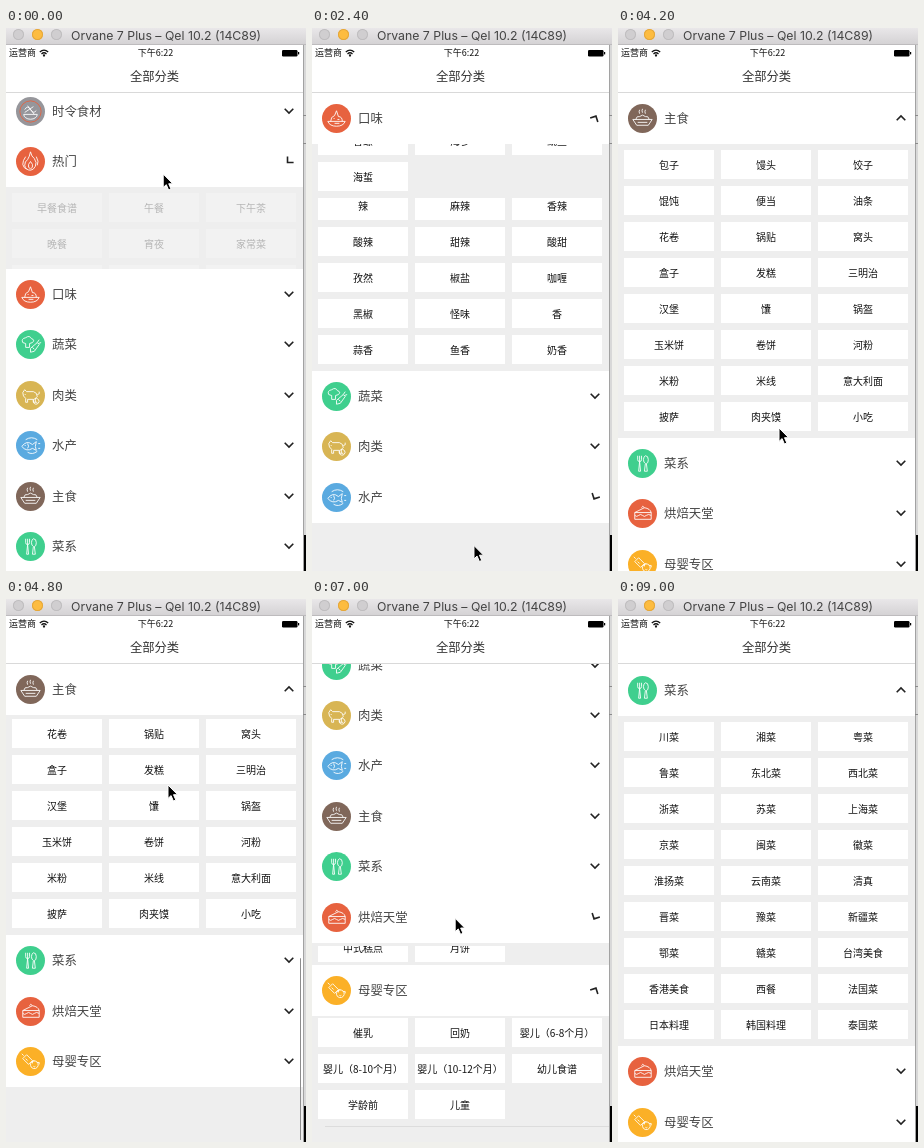
These frames come from a looping animation (300 by 543 pixels, 9.2 s). An HTML page:

```html
<!DOCTYPE html>
<html lang="zh-CN">
<head>
<meta charset="utf-8">
<title>全部分类</title>
<style>
  html, body { margin: 0; width: 100%; height: 100%; overflow: hidden; }
  body { position: relative; background: #efefef; color: #444;
    font-family: "Noto Sans CJK SC", "Noto Sans CJK", sans-serif; }
  #stage { position: absolute; left: 0; top: 0; width: 300px; height: 543px; overflow: hidden; }
  #stage div, #stage svg { position: absolute; }
  #stage svg { overflow: visible; }
  #list { left: 0; top: 0; width: 297px; height: 543px; overflow: hidden; background: #eee; isolation: isolate; }
  .head { left: 0; top: 0; width: 297px; height: 51px; background: #fff; z-index: 2; }
  .head .label { left: 46px; top: 0; font-size: 12.4px; line-height: 50px; white-space: nowrap; }
  .head .icon { left: 9.5px; top: 10.5px; width: 29px; height: 29px; }
  .head .chev { left: 278px; top: 20px; width: 10px; height: 10px; }
  .body { left: 0; top: 0; width: 297px; overflow: hidden; }
  .cells { left: 0; width: 297px; background: #eee; }
  .cell { width: 90px; height: 29px; background: #fff; color: #111; text-align: center;
    font-size: 10px; line-height: 29px; white-space: nowrap; }
  #rule { left: 13px; top: 0; width: 284px; height: 1px; background: #dcdcdc; }
  #bar { left: 293.5px; top: 359px; width: 1.6px; height: 182px; border-radius: 1px; background: #8c8c8c; z-index: 3; }
  #nav { left: 0; top: 17px; width: 297px; height: 47px; background: #fff; border-bottom: 1px solid #d9d9d9; color: #111; }
  #nav div { white-space: nowrap; }
  #win { left: 0; top: 0; width: 300px; height: 17px; background: linear-gradient(#e9e7e9, #d3d1d3);
    box-shadow: inset 0 -1px #bdbbbd; }
  #win .dot { top: 1px; width: 11px; height: 11px; border-radius: 50%; background: #d0ced0; box-shadow: inset 0 0 0 1px #bfbdbf; }
  #win .title { left: 65px; top: 0; font: 12.3px/15px Inter, sans-serif; color: #444; white-space: nowrap; }
  #edge { left: 297px; top: 17px; width: 3px; height: 526px;
    background: linear-gradient(#8b8b8b, #8b8b8b) 0 70px / 3px 1px no-repeat,
      linear-gradient(#8b8b8b, #8b8b8b) 0 98px / 3px 1px no-repeat,
      linear-gradient(#000, #000) 1px 490px / 2px 36px no-repeat,
      linear-gradient(90deg, #a2a2a2 1px, #d8d8d8 1px); }
</style>
</head>
<body>
<div id="stage">
  <div id="list"><div id="rule"></div><div id="bar"></div></div>
  <div id="nav">
    <div style="left:3px;top:1px;font-size:9px;line-height:14px">运营商</div>
    <svg style="left:33px;top:4px" width="10" height="8" fill="none" stroke="#111" stroke-width="1.3">
      <path d="M.8 3Q5-.8 9.2 3M2.5 4.9Q5 2.6 7.5 4.9"/><circle cx="5" cy="6.5" r=".5"/>
    </svg>
    <div style="left:0;top:1px;width:299px;text-align:center;font-size:9px;font-weight:500;line-height:14px">下午6:22</div>
    <svg style="left:276px;top:5px" width="18" height="7"><rect width="15.5" height="6.4" rx="1.2"/><rect x="16" y="2" width="1.2" height="2.4"/></svg>
    <div style="left:0;top:20px;width:297px;text-align:center;font-size:12.3px;line-height:22px;color:#333">全部分类</div>
  </div>
  <div id="edge"></div>
  <div id="win">
    <div class="dot" style="left:7px"></div>
    <div class="dot" style="left:26px;background:#fdbc40;box-shadow:inset 0 0 0 1px #e3a63a"></div>
    <div class="dot" style="left:45px"></div>
    <div class="title">Orvane 7 Plus – Qel 10.2 (14C89)</div>
  </div>
  <svg id="cursor" width="12" height="18">
    <path d="M0 0V13.4L3.1 10.6 5.4 16 7.8 15 5.5 9.7H9.6Z" fill="#000" stroke="#fff" stroke-width="1"/>
  </svg>
</div>
<script>
const LOOP = 9200, STEP = 200, MOVE = 500;
const TOP = 64.6, BOTTOM = 548, HEAD = 50.4, ROW = 36;

// label, disc colour, icon strokes, cells
const SECTIONS = [
  ['时令食材', '#96969b', 'M8 18a7 5 0 0 0 14 0zM9 13q3-5 6 0t6 1M12 9l7 9M9 16l9-6', ''],
  ['热门', '#e7623f', 'M15 5q1 5 4 7 3 4 1 8-2 4-5 4-5 0-6-5 0-4 3-6 2-3 3-8M10 10q-3 4-3 8 1 4 4 5M15 15q3 3 2 6-2 3-4 0-1-3 2-6M21 10q3 5 1 9',
    '早餐食谱 午餐 下午茶 晚餐 宵夜 家常菜 快手菜 凉菜 汤羹 甜品 饮品 小吃 烧烤 火锅 便当 素菜 粥 面食 沙拉 炒饭 卤味 果汁 零食 点心 炖菜 蒸菜 酱料'],
  ['口味', '#e7623f', 'M6 18h18q-2 5-9 5t-9-5M9 18q0-5 4-6l2-5 2 6q4 0 4 5M12 15h1M16 16h2M13 20h5',
    '清淡 咸鲜 原味 酸 甜 苦 辣 麻辣 香辣 酸辣 甜辣 酸甜 孜然 椒盐 咖喱 黑椒 怪味 香 蒜香 鱼香 奶香'],
  ['蔬菜', '#3fcf8e', 'M7 13q-2-4 3-5 4-3 6 1 4 1 1 4l-3 1v4h-4v-4zM15 19l7-6 2 2-5 7-4 1zM22 13l2-3M23 14l3-1M17 18l2 2', ''],
  ['肉类', '#d8b554', 'M7 12l2-3 2 2h7q4 1 4 5l-2 2v4h-2v-3h-6v3h-2v-4q-3-2-3-6M9 14h1M22 14q3 0 2-3M18 22a3 3 0 1 1 5 1 3 3 0 0 1-5-1M20 22h2', ''],
  ['水产', '#5aaae0', 'M6 16q5-7 11-2l4-3-1 5 1 4-4-2q-6 4-11-2M9 15h1M12 13q2 3 0 5M10 9q6-4 12 0M12 22q5 3 10-1M23 13h2M23 18h2',
    '草鱼 鲫鱼 虾仁 海虾 河虾 北极虾 龙虾 明虾 基围虾 小龙虾 皮皮虾 对虾 江虾 大闸蟹 梭子蟹 河蟹 螃蟹 青蟹 海蟹 蛤蜊 蛏子 鲍鱼 扇贝 生蚝 香螺 海参 鱿鱼 海蜇'],
  ['主食', '#80675a', 'M5 16h20l-4 6H9zM8 16q1-4 4-3 3-3 6 0 3-1 4 3M12 10q-1-2 0-4M15 9q-1-2 0-4M18 10q-1-2 0-4M10 19h10',
    '包子 馒头 饺子 馄饨 便当 油条 花卷 锅贴 窝头 盒子 发糕 三明治 汉堡 馕 锅盔 玉米饼 卷饼 河粉 米粉 米线 意大利面 披萨 肉夹馍 小吃'],
  ['菜系', '#3fcf8e', 'M10 7v4q0 2 2 2t2-2V7M12 7v6l-1 10h2l-1-10M18 7q3 0 3 4t-2 4l1 8h-3l1-8q-2-1-2-4t2-4',
    '川菜 湘菜 粤菜 鲁菜 东北菜 西北菜 浙菜 苏菜 上海菜 京菜 闽菜 徽菜 淮扬菜 云南菜 清真 晋菜 豫菜 新疆菜 鄂菜 赣菜 台湾美食 香港美食 西餐 法国菜 日本料理 韩国料理 泰国菜'],
  ['烘焙天堂', '#e7623f', 'M7 14l10-5q6 1 7 5v7H7zM7 14h17M7 17q2 2 4 0t4 0 4 0 5 0M14 9q1-3 3 0',
    '蛋糕 面包 饼干 蛋挞 泡芙 曲奇 布丁 慕斯 吐司 中式糕点 月饼'],
  ['母婴专区', '#fbb027', 'M7 12l4-4 6 6-4 4zM8 9l-2-2M10 12l2 2M15 19a4 4 0 1 1 7 2 4 4 0 0 1-7-2M17 17q-1-3 2-3M22 16q3-1 2 2M18 20q1 1 2 0',
    '催乳 回奶 婴儿（6-8个月） 婴儿（8-10个月） 婴儿（10-12个月） 幼儿食谱 学龄前 儿童'],
];

// Where the pointer is and what it does there: open a section or drag the list
const ACTIONS = [
  { at: -163, x: 157, y: 121, open: 1 },
  { at: 1080, x: 160, y: 470, open: 2 },
  { at: 2278, x: 162, y: 517, open: 5 },
  { at: 3680, x: 161, y: 532, open: 6 },
  { at: 4300, x: 161, y: 400, drag: 376 },
  { at: 4850, x: 162, y: 186, drag: 315.6 },
  { at: 5680, x: 173, y: 520, open: 9 },
  { at: 6300, x: 150, y: 380, drag: 175.8 },
  { at: 6878, x: 143, y: 321, open: 8 },
  { at: 8280, x: 148, y: 270, open: 7 },
  { at: 9000, x: 175, y: 560 },
];

const $ = id => document.getElementById(id);
const list = $('list');
const mix = (a, b, p) => a + (b - a) * p;

function ease(u) {
  u = Math.max(0, Math.min(1, u));
  return u * u * (3 - 2 * u);
}

function add(parent, cls, html = '') {
  const el = document.createElement('div');
  el.className = cls;
  el.innerHTML = html;
  parent.append(el);
  return el;
}

const sections = SECTIONS.map(([label, color, path, names], i) => {
  const items = names ? names.split(' ') : [];
  const full = items.length ? 7 + ROW * Math.ceil(items.length / 3) : 0;
  const body = add(list, 'body');
  const cells = add(body, 'cells');
  cells.style.height = full + 'px';
  items.forEach((name, k) => {
    const cell = add(cells, 'cell', name);
    cell.style.left = 6 + 97 * (k % 3) + 'px';
    cell.style.top = 7 + ROW * Math.floor(k / 3) + 'px';
  });
  const ring = i ? '' : '<circle cx="15" cy="15" r="11" stroke="#e7623f"/>';
  const head = add(list, 'head',
    `<svg class="icon" viewBox="0 0 30 30" fill="none" stroke="#fff" stroke-width=".9" stroke-linejoin="round">
      <circle cx="15" cy="15" r="15" fill="${color}" stroke="none"/>${ring}<path d="${path}"/></svg>
    <div class="label">${label}</div>
    <svg class="chev" viewBox="-5 -5 10 10" fill="none" stroke="#222" stroke-width="1.6"><path d="M-4.3-2.2L0 2.1 4.3-2.2"/></svg>`);
  // scroll position the list takes when this section is opened
  const rest = Math.min(HEAD * i, TOP + HEAD * SECTIONS.length + full - BOTTOM);
  return { full, rest, body, cells, head, chev: head.querySelector('.chev path') };
});

// Replay the actions up to time t
function stateAt(t) {
  const poses = sections.map(() => ({ open: 0, angle: 0, opening: false }));
  let scroll = -7.5, current = -1, dragging = false;
  for (const { at, open, drag } of ACTIONS) {
    if (t < at) break;
    const p = ease((t - at) / MOVE);
    if (open !== undefined) {
      if (current >= 0) poses[current] = { open: 1 - p ** 1.8, angle: 180 + 180 * p, opening: false };
      poses[open] = { open: p, angle: 180 * p, opening: p < 1 };
      current = open;
    }
    scroll = mix(scroll, drag ?? (open === undefined ? scroll : sections[open].rest), p);
    dragging = drag !== undefined && t - at <= MOVE;
  }
  return { poses, scroll, dragging };
}

function pointerAt(t) {
  const k = ACTIONS.findLastIndex(a => a.at <= t);
  const a = ACTIONS[k], b = ACTIONS[k + 1] ?? a;
  const p = b === a ? 0 : ease(1.25 * (t - a.at) / (b.at - a.at));
  return `translate(${mix(a.x, b.x, p)}px, ${mix(a.y, b.y, p)}px)`;
}

function place(el, y) {
  el.style.transform = `translateY(${Math.round(y)}px)`;
}

function draw(t) {
  const { poses, scroll, dragging } = stateAt(t);
  let y = TOP - scroll;
  sections.forEach((s, i) => {
    const { open, angle, opening } = poses[i];
    const h = s.full * open, end = y + HEAD + h;
    const fades = opening && i === 1;
    const slides = opening && !fades;
    place(s.head, Math.max(y, Math.min(TOP, end - HEAD)));
    s.chev.setAttribute('transform', `rotate(${angle})`);
    // new rows slide down where the section will come to rest, over the others
    place(s.body, slides ? TOP + HEAD * (i + 1) - s.rest : y + HEAD);
    s.body.style.height = h + 'px';
    s.body.style.zIndex = slides ? 1 : 0;
    s.cells.style.top = (fades ? 0 : h - s.full) + 'px';
    s.cells.style.opacity = fades ? open : 1;
    y = end;
  });
  place($('rule'), y);
  $('rule').style.display = poses[9].open ? '' : 'none';
  $('bar').style.display = dragging ? '' : 'none';
  $('cursor').style.transform = pointerAt(t);
}

const start = performance.now();
let shown = -1;
function tick() {
  const t = Math.floor((performance.now() - start) % LOOP / STEP) * STEP;
  if (t !== shown) draw(shown = t);
  requestAnimationFrame(tick);
}
tick();
</script>
</body>
</html>
```
